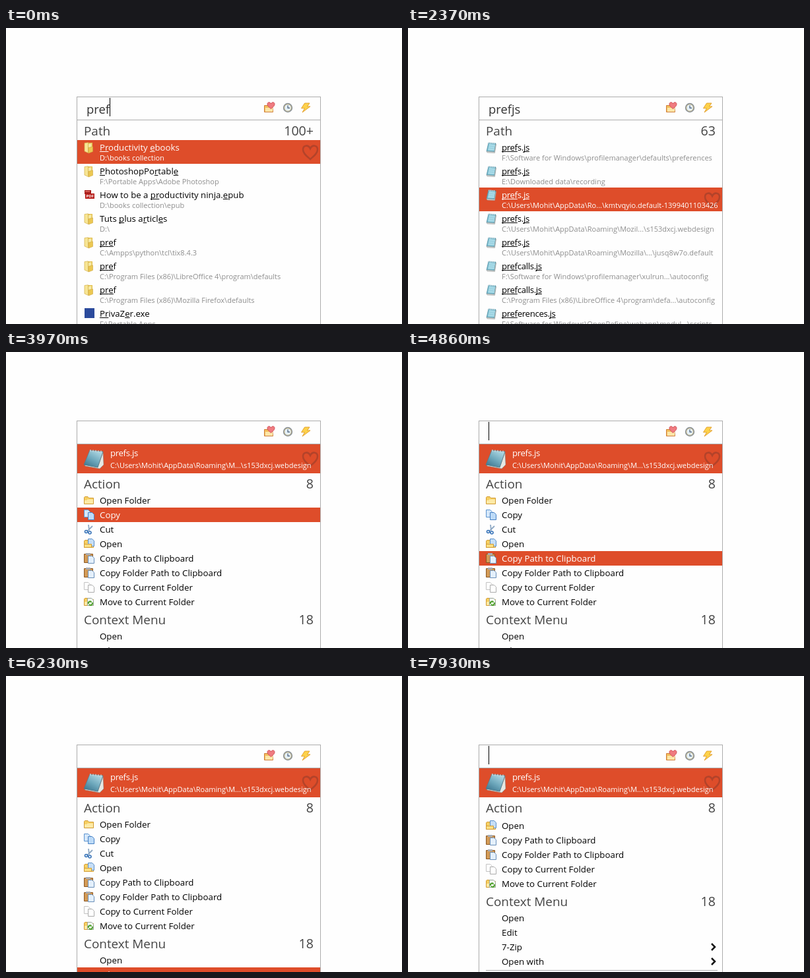
Animation of 600 by 449 pixels, one loop 8000 ms. Source, as an HTML page with a canvas:

```html
<!DOCTYPE html>
<html lang="en">
<head>
<meta charset="utf-8">
<title>Launcher search</title>
<style>
  html, body { margin: 0; width: 600px; height: 449px; overflow: hidden; background: #fefefe; }
  canvas { display: block; }
</style>
</head>
<body>
<canvas id="stage" width="600" height="449"></canvas>
<script>
const ctx = document.getElementById('stage').getContext('2d');
const LOOP = 8000;
const LEFT = 108, WIDTH = 368;
const ACCENT = '#de4d2a', BORDER = '#acacac', INK = '#000', MUTED = '#8e8e8e', HEADING = '#444';
const FAMILY = '"Open Sans", "Noto Sans", sans-serif';

// ---------- drawing helpers ----------
function rect(x, y, w, h, color) {
  ctx.fillStyle = color;
  ctx.fillRect(x, y, w, h);
}

function text(str, x, y, size, color, { align = 'left', spacing = 0, weight = '' } = {}) {
  ctx.font = `${weight} ${size}px ${FAMILY}`;
  ctx.letterSpacing = spacing + 'px';
  ctx.textAlign = align;
  ctx.fillStyle = color;
  ctx.fillText(str, x, y);
}

function shape(d, fill, stroke, width = 1) {
  const path = new Path2D(d);
  if (fill) { ctx.fillStyle = fill; ctx.fill(path); }
  if (stroke) { ctx.strokeStyle = stroke; ctx.lineWidth = width; ctx.stroke(path); }
}

function place(icon, x, y, scale = 1) {
  ctx.save();
  ctx.translate(x, y);
  ctx.scale(scale, scale);
  icon();
  ctx.restore();
}

// ---------- icons ----------
const HEART = 'M0 10.5C-5 6 -11 2 -11 -4C-11 -11 -3 -12 0 -5.5C3 -12 11 -11 11 -4C11 2 5 6 0 10.5Z';

const page = (x, y, fill, edge) =>
  shape(`M${x + .5} ${y + .5}h6l3 3v8h-9Z`, fill, edge);

function yellowFolder() {
  shape('M.5 13.5V3.5L1.5 2.5H6L7.5 4.5H14.5V13.5Z', '#f6cf62', '#d19a32');
  shape('M1 8h3l1.5-1.5h8.5v6.5h-13Z', '#fdeaa6');
}

const icons = {
  folder() {
    shape('M6 1H13V14L7 16Z', '#e3c04f');
    shape('M7 3L11.5 2V13L7 15Z', '#f6eaa6');
    shape('M1 1.5L6.5 .8V16.5L1 14Z', '#f7e594', '#d4b04a', .7);
    shape('M7 8.5L13.5 7V14.5L7 17Z', '#ecc852', '#cda43d', .6);
  },
  pdf() {
    rect(1, 1, 10, 6, '#a51f1c');
    rect(2, 2, 7, 2, '#d45a52');
    rect(2, 6, 14, 8, '#b8201c');
    text('PDF', 3.5, 12.4, 6, '#fff', { weight: 'bold' });
  },
  exe() { rect(1, 0, 15, 15, '#2b4a9c'); },
  note() {
    shape('M4 1L15 2L13 15L1 14Z', '#6fb4c8', '#5793a5', .7);
    shape('M5 3L14 4L12.5 13L3 12.5Z', '#a9dbe8');
    shape('M1 14L13 15L15 3L15.5 4L13.5 16.5L2 16Z', '#d8d8d4', '#8b9294', .5);
    shape('M5 .5v2M7.5 .7v2M10 1v2M12.5 1.2v2', null, '#e8eef0');
    shape('M5 6L13 7M4.5 9L12.5 10', null, '#8fc8d8', .7);
  },
  bigNote() {
    const shade = ctx.createLinearGradient(22, 4, 8, 28);
    shade.addColorStop(0, '#a9d3df');
    shade.addColorStop(.5, '#6fa9bd');
    shade.addColorStop(1, '#3f7891');
    shape('M2 24L22 28L30 5L31 24L25 30L3 26Z', '#e6e8e3', '#777f80', .5);
    shape('M10 2L30 4L22 28L1 24Z', shade, '#4c7c8d', .7);
    shape('M11 1v3M15 1.4v3M19 1.8v3M23 2.2v3M27 2.6v3', null, '#d7dddd', 1.2);
  },
  open: yellowFolder,
  copy() {
    page(0, 0, '#d5e8fa', '#5b93cf');
    page(6, 4, '#bddbf7', '#4680c4');
  },
  cut() {
    shape('M7 1L8 10M13 3L5 11', null, '#8fa9c4', 1.8);
    shape('M1.5 11.5a2 2 0 1 0 4 0a2 2 0 1 0 -4 0M7 13a2 2 0 1 0 4 0a2 2 0 1 0 -4 0', null, '#3572b8', 1.6);
  },
  openFile() {
    yellowFolder();
    page(6, 0, '#c5def6', '#5b8fc9');
    shape('M.5 8.5h11v5h-11Z', '#fbdf83', '#d19a32');
  },
  paste() {
    shape('M.5 1.5h13v13h-13Z', '#d39a56', '#8a5722');
    rect(3, 0, 7, 3, '#a9adb4');
    page(6, 4, '#e4f0fc', '#6a8fb8');
  },
  blankCopy() {
    page(0, 0, '#fff', '#c3c3c3');
    page(6, 4, '#fff', '#ababab');
  },
  move() {
    yellowFolder();
    page(5, 2, '#f4f8f2', '#9aa59a');
    shape('M7 11a2.6 2.6 0 0 1 4.5-2.5M12.5 9a2.6 2.6 0 0 1-4.5 2.8', null, '#4a9e26', 2);
  },
  favorite() {
    shape('M.5 4.5h12l1 10h-13Z', '#f2bd5c', '#cf7f3c');
    shape('M2 8h11v6h-11Z', '#fce6a8');
    ctx.translate(10.5, 4.5);
    ctx.scale(.5, .48);
    shape(HEART, '#ef7b80', '#d04d55', 2);
  },
  clock() {
    shape('M.8 8a7.2 7.2 0 1 0 14.4 0a7.2 7.2 0 1 0 -14.4 0', '#8d959c');
    shape('M2.8 8a5.2 5.2 0 1 0 10.4 0a5.2 5.2 0 1 0 -10.4 0', '#e4f0fa', '#d0b878', .8);
    shape('M8 4.5V8.3H11', null, '#4a5e78', 1.2);
  },
  bolt() { shape('M6.5 1H14L10.5 6H15L3 15L6.5 8.8H1.5Z', '#fdd24a', '#e09a28', .9); },
};

// ---------- content ----------
const row = (icon, title, path, marks) => ({ icon, title, path, marks });

const fuzzyRows = [
  row('folder', 'Productivity ebooks', 'D:\\books collection', [0, 1, 13]),
  row('folder', 'PhotoshopPortable', 'F:\\Portable Apps\\Adobe Photoshop', [0, 11, 16]),
  row('pdf', 'How to be a productivity ninja.epub', 'D:\\books collection\\epub', [12, 13, 31]),
  row('folder', 'Tuts plus articles', 'D:\\', [5, 11, 16]),
  row('folder', 'pref', 'C:\\Ampps\\python\\tcl\\tix8.4.3', [0, 1, 2]),
  row('folder', 'pref', 'C:\\Program Files (x86)\\LibreOffice 4\\program\\defaults', [0, 1, 2]),
  row('folder', 'pref', 'C:\\Program Files (x86)\\Mozilla Firefox\\defaults', [0, 1, 2]),
  row('exe', 'PrivaZer.exe', 'F:\\Portable Apps', [0, 1, 6]),
];

const HOME = 'C:\\Users\\Mohit\\AppData\\';
const scripts = [
  ['prefs.js', 'F:\\Software for Windows\\profilemanager\\defaults\\preferences'],
  ['prefs.js', 'E:\\Downloaded data\\recording'],
  ['prefs.js', HOME + 'Ro...\\kmtvqyio.default-1399401103426'],
  ['prefs.js', HOME + 'Roaming\\Mozil...\\s153dxcj.webdesign'],
  ['prefs.js', HOME + 'Roaming\\Mozilla\\...\\jusq8w7o.default'],
  ['prefcalls.js', 'F:\\Software for Windows\\profilemanager\\xulrun...\\autoconfig'],
  ['prefcalls.js', 'C:\\Program Files (x86)\\LibreOffice 4\\program\\defa...\\autoconfig'],
  ['preferences.js', 'F:\\Software for Windows\\OpenRefine\\webapp\\modul...\\scripts'],
];

// Marks "pref" plus the given number of letters of the "js" ending.
const scriptRows = tail => scripts.map(([title, path]) => {
  const end = title.length - 2;
  return row('note', title, path, [0, 1, 2, 3, end, end + 1].slice(0, 4 + tail));
});

const fuzzy = { rows: fuzzyRows, count: '100+' };
const pref = {
  rows: [...fuzzyRows.slice(4, 7).map(r => ({ ...r, marks: [0, 1, 2, 3] })), ...scriptRows(0).slice(0, 5)],
  count: '100+',
};
const prefj = { rows: scriptRows(1), count: '78' };
const prefjs = { rows: scriptRows(2), count: '63' };

const actions = [
  ['open', 'Open Folder'], ['copy', 'Copy'], ['cut', 'Cut'], ['openFile', 'Open'],
  ['paste', 'Copy Path to Clipboard'], ['paste', 'Copy Folder Path to Clipboard'],
  ['blankCopy', 'Copy to Current Folder'], ['move', 'Move to Current Folder'],
];
const menu = [['Open'], ['Edit'], ['7-Zip', true], ['Open with', true]];

// ---------- timeline: [start in ms, value] ----------
const query = [[0, 'pref'], [240, 'prefj'], [610, 'prefjs'], [3440, '']];
const results = [[0, fuzzy], [120, pref], [360, prefj], [610, prefjs]];
const resultIndex = [[0, 0], [1890, 1], [2370, 2], [2620, 3]];
const actionIndex = [[0, 0], [3870, 1], [4300, 2], [4400, 3], [4860, 4], [4970, 5], [5430, 6],
  [5780, 7], [6010, 8], [6230, 9], [6580, 10], [7070, -1]];
const scrollTop = [[0, 0], [7310, 16], [7570, 38], [7930, 64]];
const caretFlips = [1070, 1660, 2130, 2750, 3230, 3440, 3970, 4510, 5090, 5430, 6010, 6580, 7070, 7570];
const caretX = { pref: 157, prefj: 161, prefjs: 170, '': 122 };
const ACTIONS_OPEN = 3440;

const at = (track, t) => track.findLast(([start]) => start <= t)[1];
const caretOn = t => caretFlips.filter(flip => flip <= t).length % 2 === 0;

// ---------- views ----------
function heading(label, count, y) {
  text(label, 118, y, 18.9, HEADING);
  text(count, 466, y, 19.6, HEADING, { align: 'right' });
}

function outlineHeart(y) {
  place(() => shape(HEART, null, '#b3432a', 2.5), 461, y);
}

function resultRow({ icon, title, path, marks }, y, selected) {
  if (selected) {
    rect(LEFT, y, WIDTH, 36, ACCENT);
    outlineHeart(y + 18.5);
  }
  place(icons[icon], 118, y + 3);
  const color = selected ? '#fff' : INK;
  const spacing = title.endsWith('.js') ? -.33 : 0;
  text(title, 142, y + 16, 13.2, color, { spacing });
  for (const i of marks) {
    const start = ctx.measureText(title.slice(0, i)).width;
    rect(142 + start, y + 17, ctx.measureText(title[i]).width, 1, color);
  }
  text(path, 142, y + 31, 11, selected ? '#fff' : MUTED);
}

function drawResults(t) {
  const { rows, count } = at(results, t);
  const selected = at(resultIndex, t);
  heading('Path', count, 163);
  rows.forEach((r, i) => resultRow(r, 170 + 36 * i, i === selected));
}

function actionRow(label, y, selected, icon, submenu) {
  if (selected) rect(LEFT, y, WIDTH, 22, ACCENT);
  if (icon) place(icons[icon], 118, y + 3);
  text(label, 142, y + 16, 13.3, selected ? '#fff' : INK);
  if (submenu) shape(`M460 ${y + 6}l5 5l-5 5`, null, '#111', 2.5);
}

function drawActions(t) {
  const selected = at(actionIndex, t);
  rect(LEFT, 140, WIDTH, 44, ACCENT);
  outlineHeart(162.5);
  place(icons.bigNote, 117, 147);
  text('prefs.js', 158, 158, 13.2, '#fff', { spacing: -.33 });
  text(HOME + 'Roaming\\M...\\s153dxcj.webdesign', 158, 176, 11, '#fff');
  heading('Action', '8', 207);

  ctx.save();
  ctx.beginPath();
  ctx.rect(LEFT, 214, WIDTH, 235);
  ctx.clip();
  ctx.translate(0, -at(scrollTop, t));
  actions.forEach(([icon, label], i) => actionRow(label, 214 + 22 * i, i === selected, icon));
  heading('Context Menu', '18', 413);
  menu.forEach(([label, submenu], i) =>
    actionRow(label, 420 + 22 * i, i + actions.length === selected, null, submenu));
  rect(118, 510, 351, 1, BORDER);
  ctx.restore();
}

function drawSearchBox(t) {
  const typed = at(query, t);
  rect(107, 104, 370, 1, BORDER);
  rect(107, 104, 1, 345, BORDER);
  rect(476, 104, 1, 345, BORDER);
  rect(LEFT, 139, WIDTH, 1, BORDER);
  text(typed, 122, 130, 18.4, '#333');
  if (caretOn(t)) rect(caretX[typed], 106, 1, 28, '#000');
  place(icons.favorite, 391, 113);
  place(icons.clock, 419, 113);
  place(icons.bolt, 446, 113);
}

const began = performance.now();

function frame() {
  const t = (performance.now() - began) % LOOP;
  rect(0, 0, 600, 449, '#fefefe');
  drawSearchBox(t);
  (t < ACTIONS_OPEN ? drawResults : drawActions)(t);
  requestAnimationFrame(frame);
}
frame();
</script>
</body>
</html>
```
